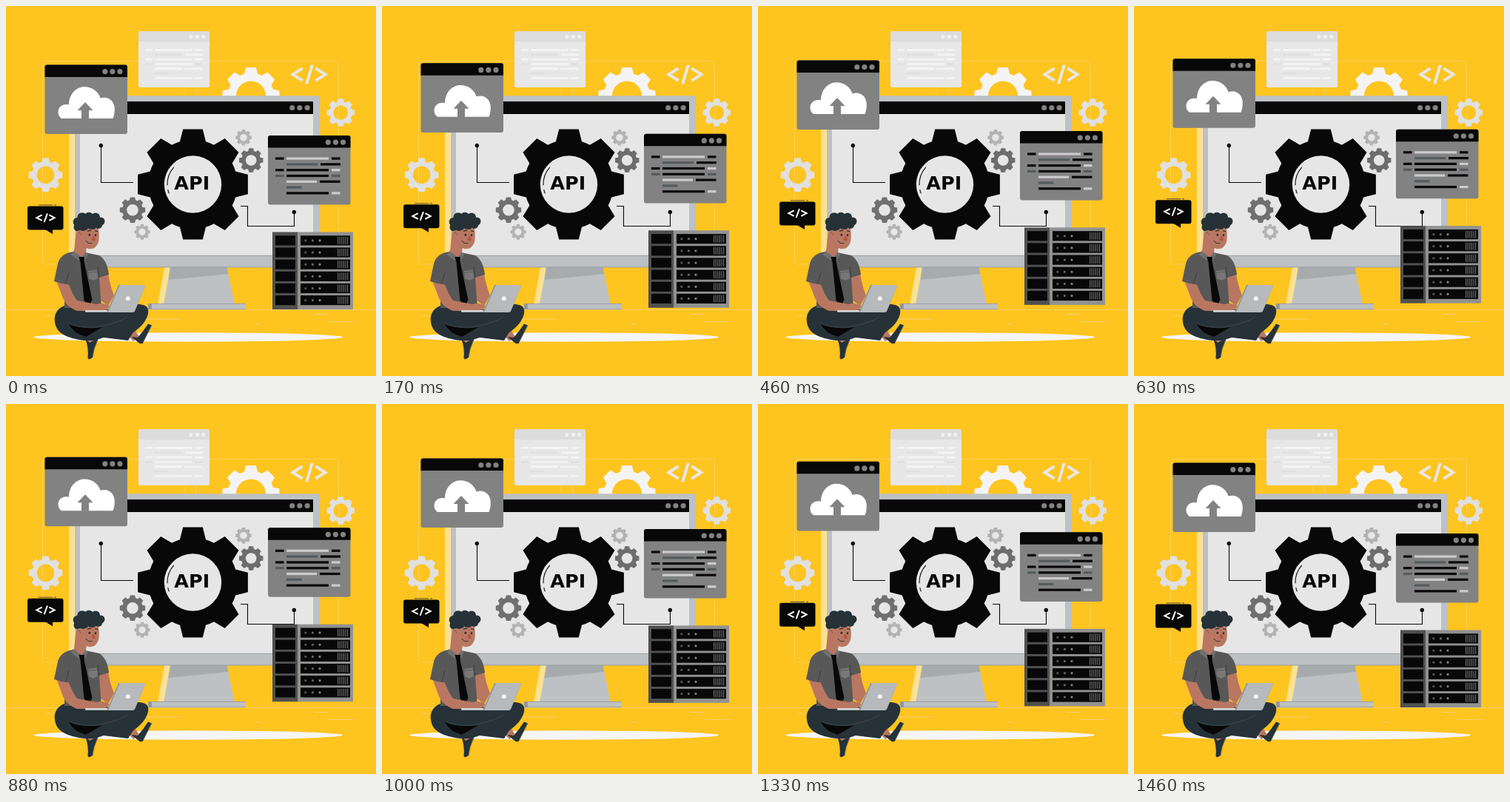
These frames come from a looping animation (500x500 px, 1.5 s). An HTML page with a canvas:

```html
<!DOCTYPE html>
<html lang="en">
<head>
<meta charset="utf-8">
<title>API</title>
<style>
html, body { margin: 0; width: 100%; height: 100%; overflow: hidden; background: #fec41f; }
canvas { display: block; width: 500px; height: 500px; }
</style>
</head>
<body>
<canvas id="stage"></canvas>
<script>
const canvas = document.getElementById('stage');
const ctx = canvas.getContext('2d');
const ratio = window.devicePixelRatio || 1;
canvas.width = canvas.height = 500 * ratio;

const YELLOW = '#fec41f', INK = '#080808', SCREEN = '#e6e6e6', METAL = '#bdc1c3';
const GREY = '#828282', SLATE = '#263238', SKIN = '#b97761', SHIRT = '#585858';
const LOOP = 1500, FRAMES = 36, LIFT = 10;

function rect(x, y, w, h, color) {
  ctx.fillStyle = color;
  ctx.fillRect(x, y, w, h);
}
function round(x, y, w, h, r, color) {
  ctx.fillStyle = color;
  ctx.beginPath();
  ctx.roundRect(x, y, w, h, r);
  ctx.fill();
}
function disc(x, y, r, color, ry = r) {
  ctx.fillStyle = color;
  ctx.beginPath();
  ctx.ellipse(x, y, r, ry, 0, 0, Math.PI * 2);
  ctx.fill();
}
function shape(d, color) {
  ctx.fillStyle = color;
  ctx.fill(new Path2D(d));
}
function line(d, color, width = 1) {
  ctx.strokeStyle = color;
  ctx.lineWidth = width;
  ctx.stroke(new Path2D(d));
}
function dots(x, y, gap, r, color) {
  for (let i = 0; i < 3; i++) disc(x + i * gap, y, r, color);
}

// Eight-toothed ring with an open centre.
function gear(x, y, outer, color, hole = outer * .52) {
  const body = outer * .81, tip = .177, root = .295;
  ctx.fillStyle = color;
  ctx.beginPath();
  for (let i = 0; i < 8; i++) {
    const a = i * Math.PI / 4;
    const point = (angle, r) => ctx.lineTo(x + r * Math.cos(a + angle), y + r * Math.sin(a + angle));
    point(-root, body);
    point(-tip, outer / Math.cos(tip));
    point(tip, outer / Math.cos(tip));
    point(root, body);
    ctx.arc(x, y, body, a + root, a + Math.PI / 4 - root);
  }
  ctx.closePath();
  ctx.moveTo(x + hole, y);
  ctx.arc(x, y, hole, 0, Math.PI * 2);
  ctx.fill('evenodd');
}

function codeMark(x, y, w, h, color, width) {
  const px = k => x + w * k, py = k => y + h * k;
  line(`M${px(.32)},${py(.18)}L${px(.05)},${py(.5)}L${px(.32)},${py(.82)}
        M${px(.59)},${py(0)}L${px(.43)},${py(1)}
        M${px(.68)},${py(.18)}L${px(.95)},${py(.5)}L${px(.68)},${py(.82)}`, color, width);
}

// Code rows: side mark, long bar, end mark; short rows break at another place.
function codeRows(x, y, scale, pitch, light, mid, dark) {
  const bar = (from, to, row, color) =>
    rect(x + from * scale, y + row * pitch, (to - from) * scale, 3.2 * scale, color);
  const full = (row, side, long, end) => {
    if (side) bar(0, 11.5, row, side);
    bar(15, 72, row, long);
    bar(76, 87.5, row, end);
  };
  full(0, dark, light, dark);
  bar(15, 57, 1, mid);
  bar(61, 88, 1, dark);
  full(2, dark, dark, light);
  full(3, mid, dark, mid);
  bar(15, 56, 4, light);
  bar(60, 87.5, 4, dark);
  bar(15, 35.5, 5, mid);
  full(6, null, dark, light);
}

function backdrop() {
  rect(0, 0, 500, 500, YELLOW);
  line('M93,349H53Q49.5,349 49.5,345V79Q49.5,74.5 54,74.5H445Q449.5,74.5 449.5,79V345Q449.5,349 445,349H424', '#fbd057');
  line('M242,109V122M257.5,109V122', '#fbd057');
  line('M0,410.5H500', '#f3d070');
  line('M186,423H234M416,416.5H435M435,426.5H471M336,430H345M54,418.5H64', '#f3d377');
  disc(246, 447.5, 209, '#f5f5f5', 6.2);

  round(179, 34, 96, 76, 3, '#e7e7e7');
  round(179, 34, 96, 14, [3, 3, 0, 0], '#dcdcdc');
  dots(250, 41.5, 8.5, 2.7, '#f0f0f0');
  codeRows(188, 58.1, .886, 6.3, '#f5f5f5', '#dfdfdf', '#f3f3f3');

  gear(331, 121.5, 38.5, '#f4f4f4');
  gear(53.5, 228.3, 22.7, '#e0e0e0');
  gear(452.3, 144, 18.8, '#e0e0e0');
  codeMark(385, 79.5, 49, 26, '#e8e8e8', 3.9);
}

function monitor() {
  round(85, 121.3, 30, 232, 4, '#fce191');
  shape('M214,353H224L214,403H205Z', '#fce191');
  shape('M222,353H298.5L309,403H213Z', METAL);
  shape('M222,353H298.5L300.5,362L219.5,370Z', '#a6abad');
  rect(192, 402, 6, 8, '#92979a');
  rect(197, 402, 127, 8, METAL);
  line('M192,409.6H324M197.5,402.4H324', '#92979a', .8);

  round(93, 121.3, 331.3, 232, 4, METAL);
  line('M94,352.9H423', '#92979a', .8);
  rect(100, 129, 315, 208, SCREEN);
  rect(100, 129, 315, 17, INK);
  line('M94,337.4H423.5', '#92979a', .8);
  dots(386.7, 137.5, 10.2, 3.6, GREY);

  gear(252.5, 241, 74.4, INK);
  ctx.strokeStyle = INK;
  ctx.lineWidth = 1.1;
  for (const [from, to] of [[178, 222], [159, 168]]) {
    ctx.beginPath();
    ctx.arc(252.5, 241, 34.5, from * Math.PI / 180, to * Math.PI / 180);
    ctx.stroke();
  }
  ctx.fillStyle = INK;
  ctx.font = '700 25.5px "DejaVu Sans", sans-serif';
  ctx.textAlign = 'center';
  ctx.fillText('API', 251.3, 248.2);

  gear(321, 177.7, 10.8, '#b3b3b3', 4.8);
  gear(331.2, 208.5, 16.2, '#6d6d6d', 7.3);
  gear(171, 275.7, 17.2, '#707070', 7.8);
  gear(184, 305.3, 10.5, '#b3b3b3', 4.7);

  line('M128.5,188.5V238.5H172M317,270.5H326.5V297.5H389.5V278.5', INK, 1.1);
  disc(128.3, 188.5, 2.7, INK);
  disc(389.3, 278.5, 2.7, INK);
}

function panel(x, y) {
  round(x, y, 111.5, 93.6, 3, GREY);
  round(x, y, 111.5, 16.5, [3, 3, 0, 0], INK);
  dots(x + 81.3, y + 9.1, 10.1, 3.6, GREY);
}

function server() {
  rect(360, 305.5, 34.5, 104.5, '#505050');
  rect(394.5, 305.5, 74.5, 104.5, '#919191');
  for (let i = 0; i < 6; i++) {
    const y = 310.3 + i * 16.15;
    rect(364, y, 27, 13.2, INK);
    rect(398, y, 67, 13.2, INK);
    ['#555', '#666', '#828282'].forEach((c, n) => disc(404.8 + n * 9.6, y + 6.6, 1.6, c));
    for (let n = 0; n < 6; n++) rect(448 + n * 2.6, y + 1.6, 1.3, 10, '#646464');
  }
}

function floating() {
  server();
  panel(52.5, 79.5);
  shape('M75,152Q70.5,149 70.5,143.5C70.5,136 77,131.5 85,133.5C85,120 94,109.3 106,109.3C117,109.3 125,116 127.5,124.5C139,121 146.8,129 146.8,139Q146.8,147 144.5,152Z', '#fff');
  shape('M107,130L117.5,141H112V152.5H102V141H96.5Z', GREY);

  panel(354, 175);
  codeRows(364, 204.5, 1, 7.8, '#cbcbcb', '#545b5e', INK);

  round(29, 270.5, 48.5, 32, 3, INK);
  shape('M53,302H63V308Z', INK);
  line('M44,269H63M65,269H68', SLATE, .8);
  codeMark(40, 280.3, 27, 11.8, '#fff', 2);
}

function legs() {
  shape('M107,445L120,446L118,456L110,455Z', SKIN);
  shape('M164,444L175,439L180,447L172,453Z', SKIN);
  shape('M82,404C68,408 65,418 66,426C67,442 82,449 106,452L120,452L132,448L165,452L172,441C186,432 193,420 192.3,411C191,403 180,402 168,404L130,411Z', SLATE);
  shape('M84,429Q104,438 130,434L108,447Q92,443 84,429Z', INK);
  line('M84,429Q104,437 128,433Q152,428 164,420', '#46545a', .7);
  shape('M106.5,448L113,455L119,452L124.5,450Q118,463 117,475L112.5,477.5L110.5,476Q112,461 106.5,448Z', SLATE);
  shape('M169.5,447L178,448Q186,439 192,429.5L197,431.5L184.5,456Q181,457 178,454Z', SLATE);
  line('M124,451Q118,464 117,475M196.5,432L184.5,456', '#58666b', .8);
}

function torso() {
  shape('M125,364L138,361Q140,376 146,391L138,405L128,398Z', SKIN);
  shape('M91,332Q74,334 70,348L65,372L79,377L79,408H129L126,367L139,363Q137,344 126,337L107,333Z', SHIRT);
  line('M80,377L85,360M126,367L124,352', '#373737', .8);
  shape('M95,305L91.5,334Q99,342 107,338L110,321Z', SKIN);
  shape('M91,331L88,336L98,344L102,339Z', '#707070');
  shape('M107,332L110.5,335L107,344L103,339Z', '#707070');
  shape('M98.5,339H106L105.5,345L116.5,397L112,406L105.5,398L100.5,346Z', INK);
  shape('M111,358L123,356.5L124,368L118.5,371L112,368.5Z', '#777');
  line('M111,360.5L123.3,359', '#525252', .7);
  shape('M69,374L85,376.5Q90,390 96,398L122,403Q133,400 140,406L134,412L96,412Q82,407 77,395Z', SKIN);
}

function head() {
  shape('M101,294L124,296Q127,309 125,319Q121,330 111,328Q103,324 100,316Z', SKIN);
  const curls = [[97, 292, 6.3], [103, 286, 6.8], [112, 285, 6.3], [121, 285.5, 6], [128, 291, 5.5],
    [125, 296, 5], [116, 294, 8], [104, 295, 9], [97, 299, 5.5]];
  for (const [x, y, r] of curls) disc(x, y, r, SLATE);
  disc(99.5, 308, 4.8, SKIN);
  line('M97.5,306Q101,306 101,310', '#8b5145', .8);
  disc(112.8, 309.2, 1.3, SLATE, 1.8);
  disc(121, 309.8, 1.2, SLATE, 1.8);
  line('M110,304.5Q113,302.5 115,304M120,304Q122,303.5 124,305', SLATE, 1.1);
  shape('M117.5,310L121,316.5Q118,318 116,316Z', '#b64f3b');
  line('M108,317Q111,322 116.5,320.5', SLATE, 1);
}

function laptop() {
  round(107, 411, 33, 2.8, 1, '#d4d7d8');
  shape('M152,377H185Q188.5,377 187.5,380L174.5,411Q173.5,414 171,414H136Z', '#92979a');
  shape('M154,377H185Q188.5,377 187.5,380L174.5,411Q173.5,414 171,414H138Z', '#b6babc');
  disc(164.8, 395.3, 2.8, '#fff');
}

// Frames fall on a 10 ms grid, 36 to the loop.
function frameAt(t) {
  const k = Math.floor((t + 5) * FRAMES / LOOP);
  return Math.round(k * LOOP / FRAMES / 10) * 10 > t ? k - 1 : k;
}

function draw(now) {
  const phase = (frameAt(now % LOOP) + .5) / FRAMES;
  const lift = LIFT * (1 - Math.abs(1 - 2 * phase));
  ctx.setTransform(ratio, 0, 0, ratio, 0, 0);
  backdrop();
  monitor();
  ctx.save();
  ctx.translate(0, LIFT / FRAMES - lift);
  floating();
  ctx.restore();
  legs();
  torso();
  head();
  laptop();
}

const start = performance.now();
function tick() {
  draw(performance.now() - start);
  requestAnimationFrame(tick);
}
tick();
</script>
</body>
</html>
```
